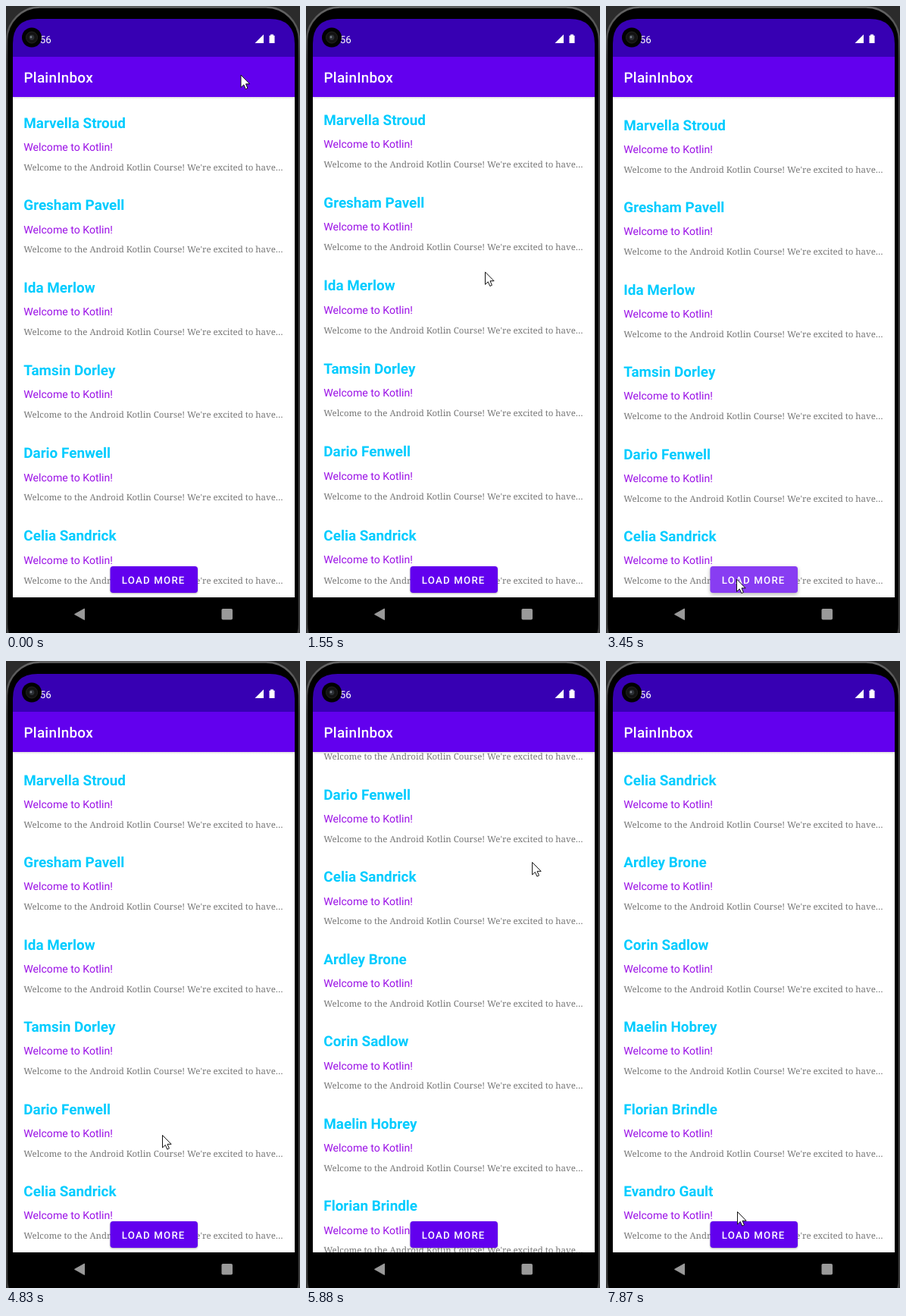
An HTML page for the animation above (8 s loop, 388 by 827 pixels).

```html
<!DOCTYPE html>
<html lang="en">
<head>
<meta charset="utf-8">
<title>Inbox list</title>
<style>
  html, body { margin: 0; width: 100%; height: 100%; overflow: hidden; background: #000; }
  svg { display: block; width: 100%; height: 100%; }
  text { font-family: Roboto, sans-serif; text-rendering: geometricPrecision; }
  .name { font-size: 18.9px; font-weight: 700; fill: #0cf; }
  .subject { font-size: 14.1px; fill: #9b12e6; }
  .preview { font-family: "Noto Serif", serif; font-size: 11.46px; fill: #777; }
  .title { font-size: 18.9px; font-weight: 500; letter-spacing: .0125em; fill: #fff; }
  .label { font-size: 13.25px; font-weight: 500; letter-spacing: .0893em; fill: #fff; }
  .clock { font-size: 13.3px; fill: #fff; }
</style>
</head>
<body>
<svg viewBox="0 0 388 827" preserveAspectRatio="none">
  <defs>
    <clipPath id="screen"><path d="M9 827V50Q9 17 42 17H348Q381 17 381 50V827Z"/></clipPath>
    <clipPath id="view"><rect x="9" y="120" width="372" height="660"/></clipPath>
    <clipPath id="pill"><rect x="137.5" y="739" width="115.5" height="35" rx="3.8"/></clipPath>
    <linearGradient id="shade" x2="0" y2="1">
      <stop stop-color="#000" stop-opacity=".13"/>
      <stop offset="1" stop-color="#000" stop-opacity="0"/>
    </linearGradient>
    <linearGradient id="rim" x2="0" y2="1">
      <stop stop-color="#666"/>
      <stop offset=".08" stop-color="#3a3a3a"/>
    </linearGradient>
  </defs>

  <rect width="388" height="827" fill="#2b2b2b"/>
  <rect x="1" y="1.5" width="386" height="858" rx="44" fill="#000" stroke="url(#rim)" stroke-width="2.5"/>

  <g clip-path="url(#screen)">
    <rect x="9" y="16" width="372" height="52" fill="#3700b3"/>
    <rect x="9" y="120" width="372" height="660" fill="#fff"/>
    <g id="list" clip-path="url(#view)"></g>
    <rect x="9" y="120" width="372" height="3" fill="url(#shade)"/>
    <rect x="9" y="67" width="372" height="53" fill="#6200ee"/>
    <text class="title" x="23.5" y="101.3">PlainInbox</text>
    <text class="clock" x="44.7" y="48.6">56</text>
    <path fill="#fff" d="M328.5 49H340V37.5ZM349 37.5H353V39H354.5V49H347.5V39H349Z"/>
  </g>

  <circle cx="34" cy="41.5" r="13" fill="#020202"/>
  <circle cx="34" cy="41.5" r="7.5" fill="#131313" stroke="#222"/>
  <circle cx="34" cy="41.5" r="3.4" fill="#2c3036"/>
  <circle cx="33" cy="41" r="1.4" fill="#777d85"/>

  <path d="M90.5 802.3L103.5 795V809.6Z" fill="#999" stroke="#999" stroke-linejoin="round"/>
  <rect x="284.5" y="795" width="14.5" height="14.5" rx="1.8" fill="#999"/>

  <rect id="button" x="137.5" y="739" width="115.5" height="35" rx="3.8" fill="#6200ee"/>
  <g clip-path="url(#pill)"><circle id="ripple" cx="172" cy="757" fill="#fff"/></g>
  <text class="label" x="152.8" y="762">LOAD MORE</text>

  <path id="cursor" d="M0 0V16.4L3.8 12.9L6.3 18.6L8.9 17.4L6.5 11.8H11.6Z"
        fill="#fff" stroke="#111" stroke-linejoin="round"/>
</svg>

<script>
const LOOP = 8000, STEP = 137, ROW = 108.5, BOTTOM = 780, HEIGHT = 660;
const $ = id => document.getElementById(id);

const names = ["Marvella Stroud", "Gresham Pavell", "Ida Merlow", "Tamsin Dorley",
  "Dario Fenwell", "Celia Sandrick", "Ardley Brone", "Corin Sadlow",
  "Maelin Hobrey", "Florian Brindle", "Evandro Gault"];

// Spans in which the screen refreshes, about every STEP ms; it is still in between
const bursts = [[0, 150], [550, 1000], [1400, 2420], [2540, 2780], [3210, 3450],
  [3720, 4140], [4830, 5340], [5340, 6430], [6430, 7870]];

// Pointer stops: time, x, y
const path = [[500, 310, 91], [1000, 222, 560], [1300, 222, 560], [1723, 247, 200],
  [2420, 178.5, 742], [2780, 172.5, 756], [3450, 172.5, 756], [4140, 203, 658],
  [4830, 206.5, 625.5], [5340, 258.5, 479.5], [6150, 338, 55.5], [6700, 338, 55.5],
  [7870, 173.5, 726.5]];

const clamp = u => Math.min(1, Math.max(0, u));

function ease(t, from, to) {
  const u = clamp((t - from) / (to - from));
  return u * u * (3 - 2 * u);
}

const pulse = (t, rise, peak, release, rest) => ease(t, rise, peak) - ease(t, release, rest);

function snap(t) {
  const [start, end] = bursts.findLast(b => b[0] <= t);
  const step = (end - start) / Math.round((end - start) / STEP);
  return Math.min(end, start + step * Math.floor((t - start) / step + 1e-6));
}

function pointerAt(t) {
  const n = path.findIndex(p => p[0] > t);
  if (n < 1) return path.at(n).slice(1);
  const [t0, x0, y0] = path[n - 1], [t1, x1, y1] = path[n];
  const u = (t - t0) / (t1 - t0);
  return [x0 + (x1 - x0) * u, y0 + (y1 - y0) * u];
}

// Overscroll lifts rows, less so towards the bottom edge
const lift = y => 1 - (1 - clamp((BOTTOM - y) / HEIGHT)) ** 2;

const lines = [];
function addLine(cls, y, str) {
  const el = document.createElementNS("http://www.w3.org/2000/svg", "text");
  el.setAttribute("class", cls);
  el.setAttribute("x", 23.3);
  el.textContent = str;
  $("list").append(el);
  lines.push({ el, y });
}
names.forEach((name, i) => {
  addLine("name", 163.5 + i * ROW, name);
  addLine("subject", 193.8 + i * ROW, "Welcome to Kotlin!");
  addLine("preview", 219.5 + i * ROW, "Welcome to the Android Kotlin Course! We're excited to have…");
});

function draw(time) {
  const t = snap(time);
  const top = 5 * ROW * ease(t, 4900, 6140);
  const pull = 9 * (pulse(t, -95, 150, 500, 1000) + pulse(t, 1240, 1710, 1750, 2400)
    + pulse(t, 6140, 6608, 6620, 7400));
  for (const { el, y } of lines) el.setAttribute("y", y - top - pull * lift(y - top));

  const glow = pulse(t, 3100, 3330, 3500, 4140);
  $("ripple").setAttribute("r", 25 + 75 * ease(t, 3210, 3450));
  $("ripple").setAttribute("opacity", .24 * glow);
  const depth = 1.2 + 1.4 * glow;
  $("button").style.filter = `drop-shadow(0 ${depth}px ${depth}px rgba(0,0,0,.3))`;

  $("cursor").setAttribute("transform", `translate(${pointerAt(t)})`);
}

function tick(now) {
  draw(now % LOOP);
  requestAnimationFrame(tick);
}
draw(0);
requestAnimationFrame(tick);
</script>
</body>
</html>
```
